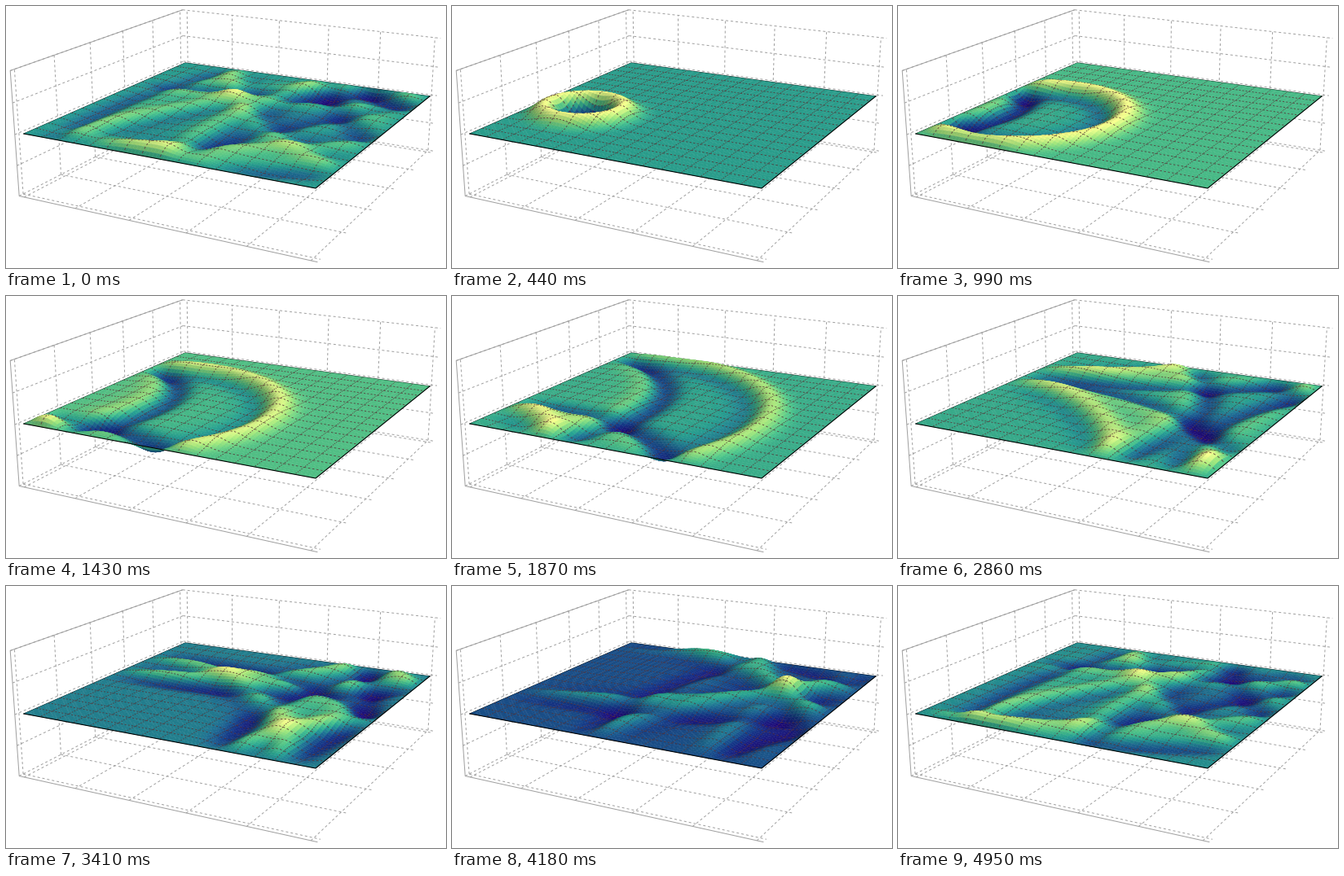
Animation of 540x322 px, one loop 5060 ms. Source, as a matplotlib script:

```python
import numpy as np
import matplotlib.pyplot as plt
from matplotlib.animation import FuncAnimation
from matplotlib.collections import LineCollection, PolyCollection
from matplotlib.colors import LinearSegmentedColormap

W, H = 540, 322
FRAMES, INTERVAL = 46, 110
PX = 0.72                      # one pixel in points at 100 dpi

CELLS, MESH_STEP = 80, 5       # surface cells per side, cells per mesh square
MODES = 40
CENTRE = (0.2, 0.35)           # where the pulse starts
SIGMA, AMP = 0.04, 0.97
STEP = 0.0377                  # distance the wave travels per frame
LO, HI = -0.02, 1.02           # box walls, slightly outside the surface
RELIEF = 0.25                  # height unit relative to the side length
LIGHT = np.array([0.5, 0.0, 0.85])

# Perspective camera: rows give x*w, y*w and w for (u, v, z, 1)
CAMERA = np.array([
    [306.0, 254.6, -5.7, 22.0],
    [36.36, -69.0, -80.0, 157.0],
    [-0.1368, 0.2572, -0.02, 1.0],
])

CMAP = LinearSegmentedColormap.from_list("sea", [
    (0.00, (0.11, 0.02, 0.45)),
    (0.20, (0.07, 0.20, 0.50)),
    (0.375, (0.11, 0.42, 0.55)),
    (0.50, (0.14, 0.60, 0.545)),
    (0.62, (0.28, 0.735, 0.52)),
    (0.80, (0.60, 0.86, 0.46)),
    (1.00, (0.95, 0.97, 0.53)),
])
MESH_COLOR = (0.34, 0.19, 0.20, 0.85)
GRID_COLOR = "#a0a0a0"


def project(u, v, z):
    u, v, z = np.broadcast_arrays(u, v, z)
    x, y, w = np.tensordot(CAMERA, np.stack([u, v, z, np.ones(u.shape)]), 1)
    return np.stack([x / w, y / w], axis=-1)


def path(*points):
    return project(*np.array(points, float).T)


# Sine series of a Gaussian pulse on a square with fixed edges
side = np.linspace(0, 1, CELLS + 1)
modes = np.arange(1, MODES + 1)
sines = np.sin(np.pi * np.outer(side, modes))


def coeffs(c):
    return (2 * SIGMA * np.sqrt(2 * np.pi) * np.sin(np.pi * modes * c)
            * np.exp(-(np.pi * modes * SIGMA) ** 2 / 2))


weights = AMP * np.outer(coeffs(CENTRE[0]), coeffs(CENTRE[1]))
omega = np.pi * np.hypot(modes[:, None], modes[None, :])


def height(step):
    return sines @ (weights * np.cos(omega * STEP * step)) @ sines.T


def corners(a):
    return a[:-1, :-1], a[1:, :-1], a[1:, 1:], a[:-1, 1:]


def back_to_front(a):
    return np.swapaxes(a, 0, 1)[::-1]


def dash(a, b):
    mid = (a + b) / 2
    return np.stack([a, mid, mid, a], axis=2)


# Each cell is painted first, then the mesh dashes on its far and left edges
idx = np.arange(CELLS)
on_left = (idx % MESH_STEP == 0) & (idx > 0)
on_far = ((idx + 1) % MESH_STEP == 0) & (idx + 1 < CELLS)
keep = np.ones((CELLS, CELLS, 3), bool)
keep[:, :, 1] = on_far[None, :]
keep[:, :, 2] = on_left[:, None]
keep = back_to_front(keep).ravel()
is_cell = np.tile([True, False, False], CELLS * CELLS)[keep]


def shade(z00, z10, z11, z01):
    """Brightness of each cell, 1 where the sheet is flat."""
    slope_u = (z10 + z11 - z00 - z01) / 2 * CELLS * RELIEF
    slope_v = (z01 + z11 - z00 - z10) / 2 * CELLS * RELIEF
    normal = np.stack([-slope_u, -slope_v, np.ones_like(slope_u)], axis=-1)
    normal /= np.linalg.norm(normal, axis=-1, keepdims=True)
    return np.clip(0.45 + 0.55 * normal @ LIGHT / LIGHT[2], 0.4, 1.06)


def surface(step):
    z = height(step)
    pts = project(side[:, None], side[None, :], z)
    p00, p10, p11, p01 = corners(pts)
    items = np.stack([np.stack([p00, p10, p11, p01], axis=2),
                      dash(p01, p11), dash(p01, p00)], axis=2)
    verts = back_to_front(items).reshape(-1, 4, 2)[keep]

    zs = corners(z)
    rgba = CMAP((sum(zs) / 4 - z.min()) / (z.max() - z.min()))
    rgba[..., :3] = np.clip(rgba[..., :3] * shade(*zs)[..., None], 0, 1)

    edge = np.tile(MESH_COLOR, (len(verts), 1))
    edge[is_cell] = back_to_front(rgba).reshape(-1, 4)
    face = edge.copy()
    face[~is_cell, 3] = 0
    return verts, face, edge


def box_grid():
    lines = []
    for t in np.linspace(0, 1, 6):
        lines += [
            path((LO, t, -1), (LO, t, 1)),      # left wall
            path((t, HI, -1), (t, HI, 1)),      # back wall
            path((t, LO, -1), (t, HI, -1)),     # floor
            path((LO, t, -1), (HI, t, -1)),
        ]
    for z in np.linspace(-1, 1, 5):
        lines += [path((LO, LO, z), (LO, HI, z)),
                  path((LO, HI, z), (HI, HI, z))]
    return lines


fig = plt.figure(figsize=(W / 100, H / 100), dpi=100, facecolor="white")
ax = fig.add_axes([0, 0, 1, 1])
ax.set_xlim(0, W)
ax.set_ylim(H, 0)
ax.axis("off")

ax.add_collection(LineCollection(box_grid(), colors=GRID_COLOR,
                                 linewidths=PX, linestyles=[(0, (3, 3))],
                                 zorder=1))
ax.add_collection(LineCollection(
    [path((LO, HI, 1), (LO, LO, 1), (LO, LO, -1), (HI, LO, -1))],
    colors=GRID_COLOR, linewidths=PX, zorder=2))


def border(zorder, *points):
    ax.plot(*path(*points).T, color="black", lw=1.1 * PX, zorder=zorder)


border(3, (0, 0, 0), (0, 1, 0), (1, 1, 0))
border(5, (0, 0, 0), (1, 0, 0), (1, 1, 0))

verts, face, edge = surface(0)
sheet = PolyCollection(verts, facecolors=face, edgecolors=edge,
                       linewidths=np.where(is_cell, 0.4 * PX, 0.9 * PX),
                       zorder=4)
ax.add_collection(sheet)


def draw(k):
    # The pulse is released on the second frame of the loop
    verts, face, edge = surface((k - 1) % FRAMES)
    sheet.set_verts(verts)
    sheet.set_facecolor(face)
    sheet.set_edgecolor(edge)
    return [sheet]


def start():
    return draw(0)


anim = FuncAnimation(fig, draw, frames=FRAMES, init_func=start,
                     interval=INTERVAL, repeat=True, repeat_delay=0,
                     blit=False)
plt.show()
```
